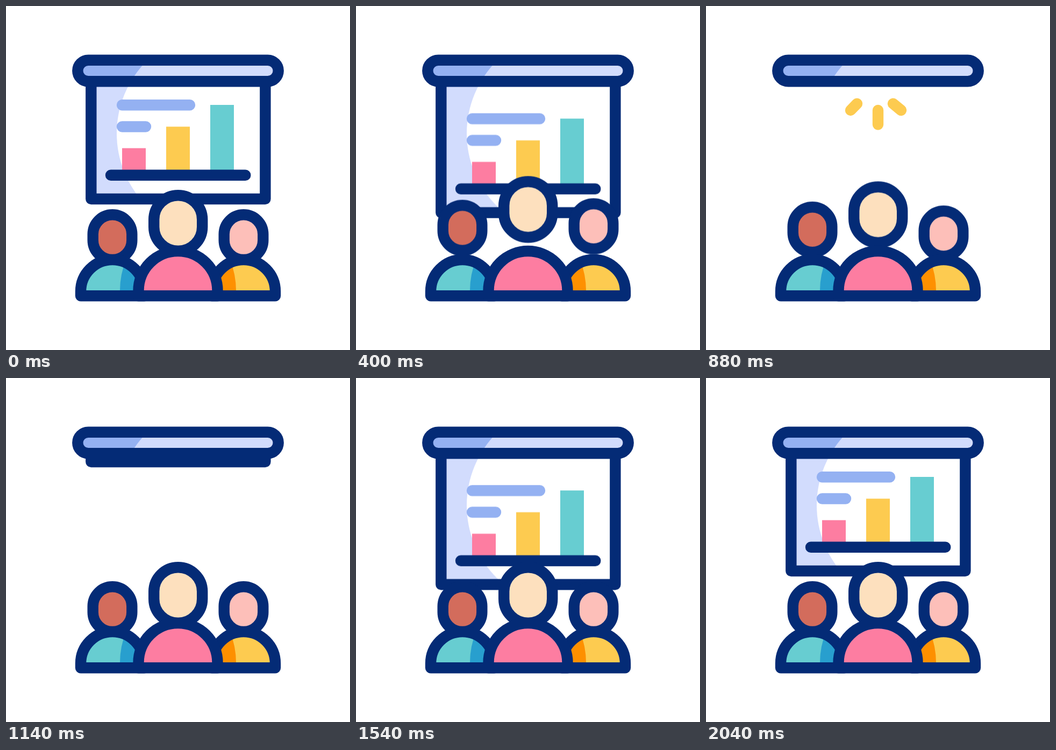
These frames come from a looping animation (640x640 px, 2400 ms). An HTML page:

```html
<!DOCTYPE html>
<html lang="en">
<head>
<meta charset="utf-8">
<title>Presentation</title>
<style>
  html, body { margin: 0; width: 100%; height: 100%; overflow: hidden; background: #fff; }
  svg { display: block; width: 100vw; height: 100vh; }

  .ink { stroke: #042b76; stroke-width: 20.4; stroke-linejoin: round; stroke-linecap: round; }
  .note { stroke: #94b1f2; stroke-width: 20.4; stroke-linecap: round; }
  .ray { stroke: #fdcb50; stroke-width: 20.4; stroke-linecap: round; stroke-dasharray: 1 2; }

  .screen, .still, .head, .ray {
    animation: 2400ms cubic-bezier(.3333, 0, .6667, 1) infinite;
  }
  .screen { --dir: 1; animation-name: roll; }
  /* cancels the roll so the light edge stays in place */
  .still { --dir: -1; animation-name: roll; }
  .left { animation-name: hop-left; }
  .mid { animation-name: hop-mid; }
  .right { animation-name: hop-right; }
  .ray { animation-name: flash; }

  @keyframes roll {
    0%, 85%, 100% { transform: translateY(0); }
    16.667%, 62.917% { transform: translateY(calc(var(--dir) * 25.5px)); }
    36.667%, 42.917% { transform: translateY(calc(var(--dir) * -239px)); }
  }
  @keyframes hop-left {
    0%, 6.417%, 24.75%, 43.083%, 100% { transform: translateY(0); }
    15.583%, 33.917% { transform: translateY(-18.2px); }
  }
  @keyframes hop-mid {
    0%, 10.25%, 25.583%, 40.917%, 100% { transform: translateY(0); }
    17.917%, 33.25% { transform: translateY(-27.4px); }
  }
  @keyframes hop-right {
    0%, 9.292%, 45.667%, 100% { transform: translateY(0); }
    19.542% { transform: translateY(-25px); }
  }
  @keyframes flash {
    0%, 32.9% { opacity: 0; stroke-dashoffset: 1; }
    33% { opacity: 1; stroke-dashoffset: 1; }
    36.4%, 38.6% { opacity: 1; stroke-dashoffset: 0; }
    42% { opacity: 1; stroke-dashoffset: -1; }
    42.1%, 100% { opacity: 0; stroke-dashoffset: -1; }
  }
</style>
</head>
<body>
<svg viewBox="0 0 640 640" fill="none">
  <defs>
    <clipPath id="below"><rect x="100" y="120" width="440" height="400"/></clipPath>
    <clipPath id="sheet"><rect x="158" y="-200" width="325" height="559"/></clipPath>
    <clipPath id="tube"><rect x="133.3" y="100.7" width="373.4" height="39.6" rx="19.8"/></clipPath>
    <path id="side-body" d="M139 539.3V531a59 59 0 0 1 118 0v8.3z"/>
    <clipPath id="body-left"><use href="#side-body"/></clipPath>
    <clipPath id="body-right"><use href="#side-body" x="244"/></clipPath>
    <rect id="side-head" x="161.7" y="388.3" width="72.6" height="83.8" rx="36.3"/>
  </defs>

  <!-- rays -->
  <path class="ray" pathLength="1" d="M281 181.700L269 194"/>
  <path class="ray" pathLength="1" d="M320 194V220.500"/>
  <path class="ray" pathLength="1" d="M348 181.700L363 194"/>

  <!-- screen -->
  <g clip-path="url(#below)">
    <g class="screen">
      <g clip-path="url(#sheet)">
        <rect x="158" y="-200" width="325" height="559" fill="#d2dcfd"/>
        <circle class="still" cx="397" cy="237" r="191" fill="#fff"/>
      </g>
      <path class="note" d="M216 184.300H342M216 224.500H260"/>
      <rect x="216" y="264.500" width="44" height="46" fill="#fd7da1"/>
      <rect x="298" y="224.500" width="44" height="86" fill="#fdcb50"/>
      <rect x="380" y="184" width="44" height="126" fill="#67cdd1"/>
      <path class="ink" d="M195 314.800H445.300M158.300 -200V359H482.400V-200"/>
    </g>
  </g>

  <!-- roller -->
  <g clip-path="url(#tube)">
    <rect x="130" y="100" width="380" height="41" fill="#94b1f2"/>
    <circle cx="397" cy="237" r="191" fill="#d2dcfd"/>
  </g>
  <rect class="ink" x="133.300" y="100.700" width="373.400" height="39.600" rx="19.800"/>

  <!-- audience -->
  <use class="head left ink" href="#side-head" fill="#d36c5c"/>
  <g clip-path="url(#body-left)">
    <rect x="130" y="465" width="130" height="80" fill="#67cdd1"/>
    <circle cx="360" cy="529" r="148" fill="#289fce"/>
  </g>
  <use class="ink" href="#side-body"/>

  <g class="head right"><use class="ink" href="#side-head" x="244" fill="#fdbfb9"/></g>
  <g clip-path="url(#body-right)">
    <rect x="375" y="465" width="130" height="80" fill="#fdcb50"/>
    <circle cx="280" cy="529" r="148" fill="#fe9000"/>
  </g>
  <use class="ink" href="#side-body" x="244"/>

  <rect class="head mid ink" x="275.200" y="352.200" width="90" height="103.800" rx="45" fill="#fde0be"/>
  <path class="ink" d="M246.500 539.300V529.500a73.500 73.500 0 0 1 147 0v9.800z" fill="#fd7da1"/>
</svg>
</body>
</html>
```
